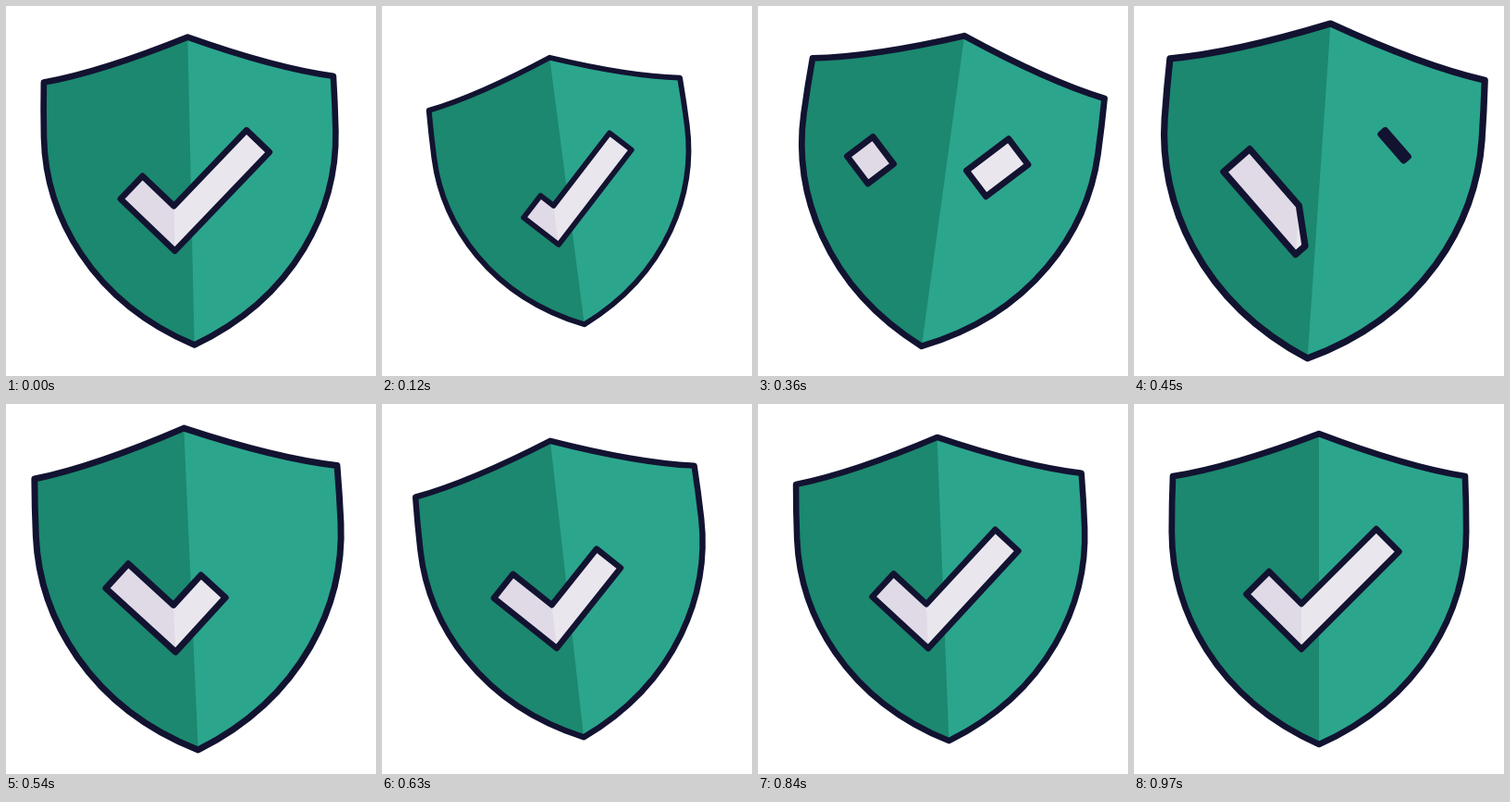
An HTML page for the animation above (1 s loop, 400 by 400 pixels).

```html
<!DOCTYPE html>
<html lang="en">
<head>
<meta charset="utf-8">
<title>Shield check</title>
<style>
  html, body { margin: 0; width: 100%; height: 100%; overflow: hidden; background: #fff; }
  svg { display: block; width: 100%; height: 100%; }
  .line { fill: none; stroke: #121331; stroke-width: 6.7; stroke-linejoin: round; }
</style>
</head>
<body>
<svg viewBox="-200 -200 400 400">
  <defs>
    <path id="half" d="M0-168Q95-132 158-122Q159.2-92 159.2-62C159.2 22 112 118 0 168Z"/>
    <path id="outline" d="M0-168Q95-132 158-122Q159.2-92 159.2-62C159.2 22 112 118 0 168C-112 118-159.2 22-159.2-62Q-159.2-92-158-122Q-95-132 0-168Z"/>
    <path id="tick"/>
    <clipPath id="shade"><path d="M-200-200H-19V200H-200Z"/></clipPath>
  </defs>
  <g id="shield">
    <use href="#outline" fill="#2ca58d"/>
    <use href="#half" transform="scale(-1 1)" fill="#1b886f"/>
    <use href="#outline" class="line"/>
    <use href="#tick" fill="#eae6ed"/>
    <g clip-path="url(#shade)"><use href="#tick" fill="#e0dae7"/></g>
    <use href="#tick" class="line"/>
  </g>
</svg>
<script>
const LOOP = 1000, STEP = 30, END = 165;
const shield = document.getElementById('shield');
const tick = document.getElementById('tick');

const linear = p => p;
const smooth = p => p * p * (3 - 2 * p);

// Keys are [time, value] pairs in order of time.
function track(t, keys, ease) {
  const i = keys.findIndex(k => k[0] > t);
  if (i < 0) return keys[keys.length - 1][1];
  const [t0, v0] = keys[i - 1], [t1, v1] = keys[i];
  return v0 + (v1 - v0) * ease((t - t0) / (t1 - t0));
}

const ROTATION = [[-30, 0], [90, -8], [350, 7.9], [640, -6.5], [970, 0]];
const SCALE = [[-30, 1], [183, .83], [457, 1.08], [675, .945], [970, 1]];
const ERASE = [[-30, 0], [0, 1.5], [60, 7.5], [120, 20.5], [180, 44],
               [240, 73.5], [360, 125], [460, END]];

// Points on the two edges of the tick; the inner one waits at the elbow.
function inner(q) {
  const e = q < 35 ? q - 35 : Math.max(0, q - 84);
  return [e - 19, 16 - Math.abs(e)];
}
const outer = q => [q - 78.5, 65 - Math.abs(q - 59.5)];

function piece(a, b) {
  const pts = [inner(a)];
  if (a < 35 && b > 84) pts.push(inner(60));
  pts.push(inner(b), outer(b));
  if (a < 59.5 && b > 59.5) pts.push(outer(59.5));
  pts.push(outer(a));
  return 'M' + pts.join('L') + 'Z';
}

function draw(now) {
  const t = Math.min(970, Math.floor((now % LOOP + 5) / STEP) * STEP);
  const turn = track(t, ROTATION, smooth), size = track(t, SCALE, smooth);
  shield.setAttribute('transform', `rotate(${turn}) scale(${size})`);

  let d = '';
  if (t < 460) d += piece(track(t, ERASE, linear), END);
  if (t > 330) {
    const tail = -1.4e-4 * Math.max(0, 810 - t) ** 2;
    const tip = END - 167.4 * ((1060 - t) / 700) ** 4;
    d += piece(tail, tip);
  }
  tick.setAttribute('d', d);
  requestAnimationFrame(draw);
}
draw(0);
</script>
</body>
</html>
```
